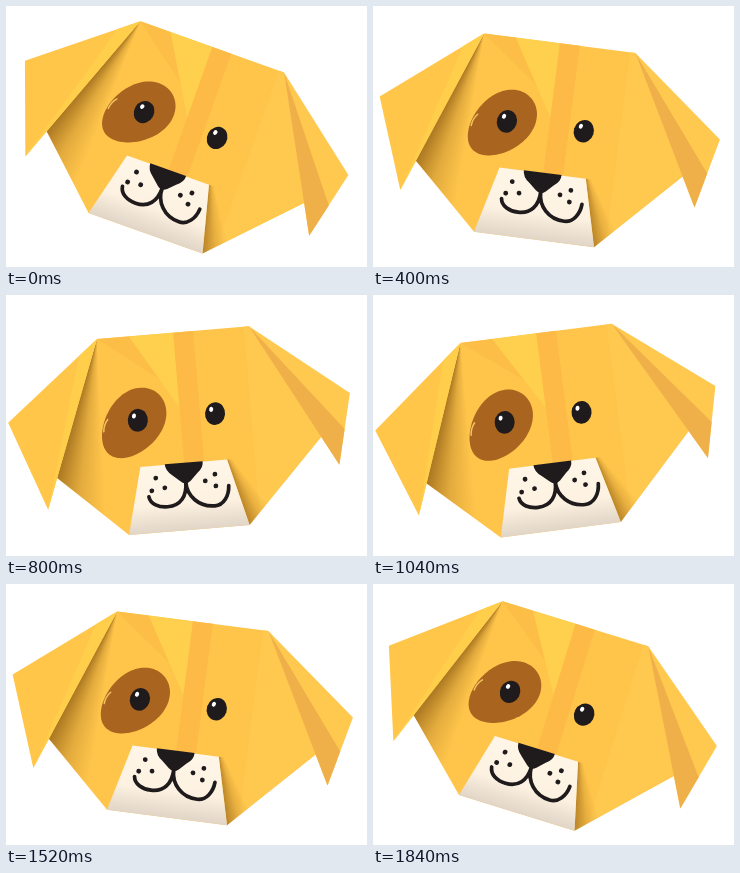
An HTML page with a canvas that plays this animation: 361x261 px, repeating every 1.92 s.

```html
<!DOCTYPE html>
<html lang="en">
<head>
<meta charset="utf-8">
<title>Paper puppy</title>
<style>
html, body { margin: 0; width: 100%; height: 100%; overflow: hidden; background: #fff; }
canvas { display: block; width: 361px; height: 261px; }
</style>
</head>
<body>
<canvas id="stage"></canvas>
<script>
const W = 361, H = 261, STEP = 80, STEPS = 24;
const LOW = -9.7, SWING = 29.3; // tilt in degrees
const INK = '#1f1a1c';
const pt = (x, y) => ({ x, y });
const pivot = pt(179.3, 130);

// Corners of the folded paper, head upright
const crownL = pt(98.5, 37), crownR = pt(251, 37);
const earL = pt(3, 113), tipL = pt(35.5, 203);
const earR = pt(346, 112), tipR = pt(329.5, 182.5);
const cheekL = pt(46, 171), cheekR = pt(314, 153);
const chinL = pt(114, 235), chinR = pt(235, 235);
const snoutL = pt(131, 168), snoutR = pt(218, 168);

const canvas = document.getElementById('stage');
const dpr = window.devicePixelRatio || 1;
canvas.width = Math.round(W * dpr);
canvas.height = Math.round(H * dpr);
const ctx = canvas.getContext('2d');
const rad = deg => deg * Math.PI / 180;
const mix = (a, b, t) => pt(a.x + (b.x - a.x) * t, a.y + (b.y - a.y) * t);
const heading = (a, b) => Math.atan2(b.y - a.y, b.x - a.x);

function poly(fill, ...pts) {
  ctx.beginPath();
  pts.forEach(p => ctx.lineTo(p.x, p.y));
  ctx.closePath();
  ctx.fillStyle = fill;
  ctx.fill();
}

function oval(fill, x, y, rx, ry = rx, tilt = 0) {
  ctx.beginPath();
  ctx.ellipse(x, y, rx, ry, rad(tilt), 0, Math.PI * 2);
  ctx.fillStyle = fill;
  ctx.fill();
}

function stroke(path, color, width) {
  ctx.strokeStyle = color;
  ctx.lineWidth = width;
  ctx.lineCap = ctx.lineJoin = 'round';
  ctx.stroke(new Path2D(path));
}

// Fold shadow: darkest along the edge a-b, fading over `spread` degrees
function shadow(a, b, spread, alpha) {
  const g = ctx.createConicGradient(heading(a, b) - rad(spread), a.x, a.y);
  const tone = t => `rgba(120,72,8,${t * alpha})`;
  const span = spread / 360;
  g.addColorStop(0, tone(0));
  g.addColorStop(span / 2, tone(0.34));
  g.addColorStop(span, tone(1));
  g.addColorStop(span + 0.02, tone(1));
  g.addColorStop(0.9, tone(0));
  return g;
}

function face() {
  const fold = pt(175, 112), brow = mix(crownL, crownR, 0.21);
  poly('#ffc54b', crownL, crownR, cheekR, chinR, chinL, cheekL);
  poly('#fdbe48', crownL, brow, mix(brow, fold, 0.6));
  poly('#ffd04d', brow, pt(fold.x, crownL.y), fold);
  ctx.fillStyle = '#fdba47';
  ctx.fillRect(fold.x, crownL.y, 20, snoutL.y - crownL.y);
  poly('#ffc94f', pt(246, 37), crownR, cheekR, pt(246, 223));

  poly(shadow(crownL, tipL, 19, 0.62), crownL, cheekL, pt(crownL.x, 220));
  const apex = mix(snoutR, chinR, -0.2);
  poly(shadow(apex, chinR, 19, 0.5), snoutR, chinR, mix(chinR, cheekR, 0.36), pt(232, 168));
}

function ears() {
  poly('#ffc64a', crownL, earL, tipL);
  poly('#ffcf4c', crownL, mix(crownL, earL, 0.2), tipL);
  poly('#ffc84e', crownR, earR, tipR);
  poly('#f0b049', crownR, mix(earR, tipR, 0.5), tipR);
}

function patch() {
  ctx.save();
  ctx.translate(127.4, 124.2);
  ctx.rotate(rad(-48));
  ctx.beginPath();
  for (let a = 0; a < 360; a += 4) {
    const c = Math.cos(rad(a)), s = Math.sin(rad(a));
    ctx.lineTo(39 * c, 27.5 * s * (1 + 0.1 * c));
  }
  ctx.fillStyle = '#a9641f';
  ctx.fill();
  ctx.restore();
  stroke('M97.5 130Q98 123 102.5 118', '#f2c35f', 1.5);
}

function eye(x, y) {
  oval(INK, x, y, 10, 11.4, 10);
  oval('#fff', x - 3.5, y - 4.6, 2, 2.5, 20);
}

function freckles(x, y, r, turn) {
  for (let i = 0; i < 3; i++) {
    const a = rad(turn + i * 120);
    oval(INK, x + r * Math.cos(a), y + r * Math.sin(a), 2.4);
  }
}

function snout() {
  const paper = ctx.createLinearGradient(0, snoutL.y, 0, chinL.y);
  paper.addColorStop(0, '#fff6e8');
  paper.addColorStop(0.6, '#fdf2e1');
  paper.addColorStop(1, '#e0d5c6');
  poly(paper, snoutL, snoutR, chinR, chinL);

  ctx.fillStyle = INK;
  ctx.fill(new Path2D('M155.5 167.5H193.5Q194 174 187 179L180 186Q175 190.5 170 186L162 179Q155.5 174 155.5 167.5Z'));
  stroke('M137 198.5C138 206 146 210 155 210C168 210 175 201 175 187C175 201 186 213 202 213C211 213 217 204 217.5 194', INK, 3.7);
  freckles(146.5, 188, 7.7, -98);
  freckles(201.3, 187.4, 6.8, -60);
}

function draw(now) {
  const k = Math.floor(now / STEP) % STEPS;
  const angle = LOW + SWING * Math.abs(k * 2 / STEPS - 1);
  ctx.setTransform(dpr, 0, 0, dpr, 0, 0);
  ctx.fillStyle = '#fff';
  ctx.fillRect(0, 0, W, H);
  ctx.translate(pivot.x, pivot.y);
  ctx.rotate(rad(angle));
  ctx.translate(-pivot.x, -pivot.y);
  face();
  ears();
  patch();
  eye(132.4, 121.3);
  eye(209.9, 121.2);
  snout();
}

let start = null;
function tick(now) {
  if (start === null) start = now;
  draw(now - start);
  requestAnimationFrame(tick);
}
draw(0);
requestAnimationFrame(tick);
</script>
</body>
</html>
```
